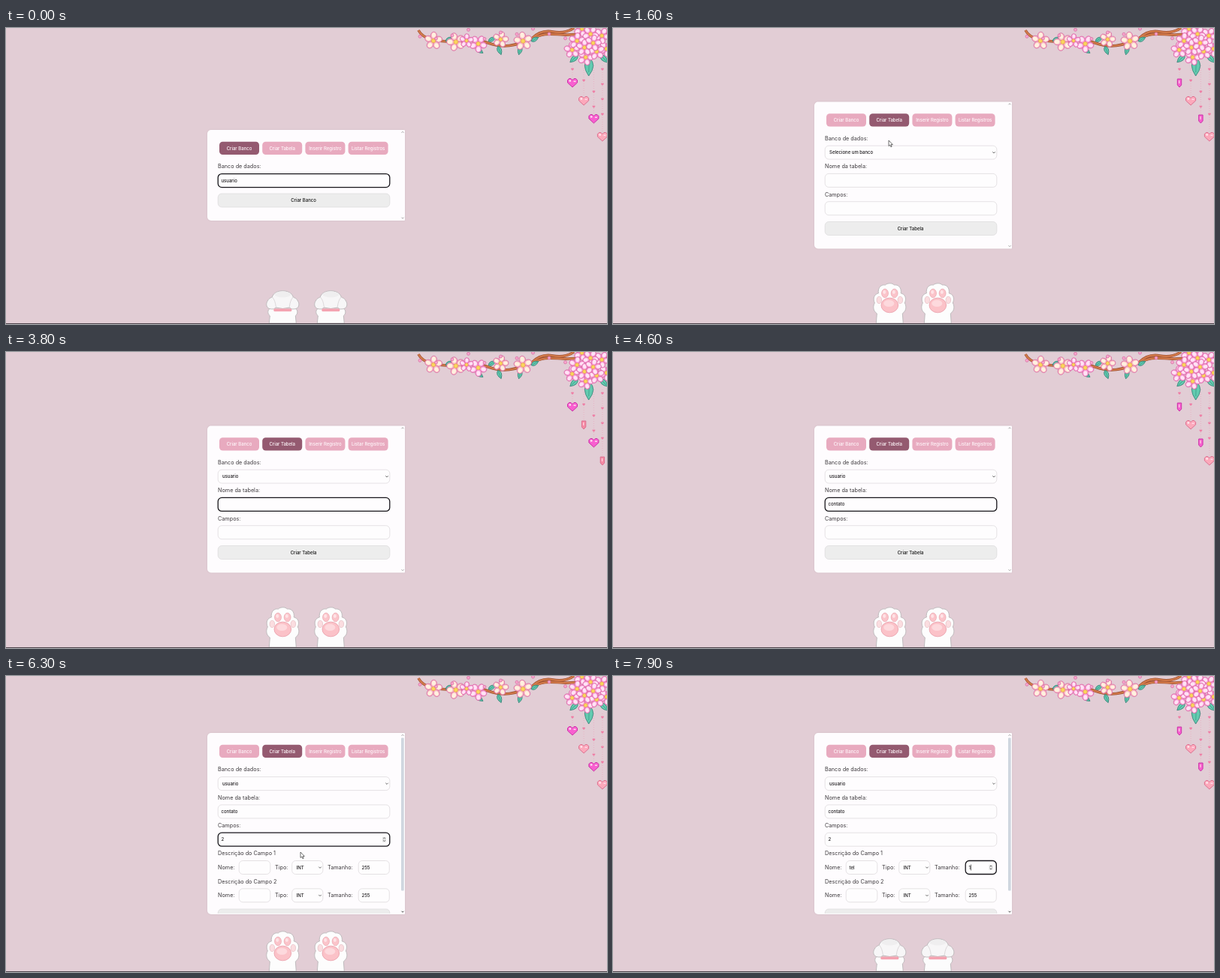
An HTML page with a canvas for the animation above (8000 ms loop, 800 px wide and 395 px high).

```html
<!DOCTYPE html>
<html lang="pt">
<head>
<meta charset="utf-8">
<title>Banco de dados</title>
<style>
html, body { margin: 0; width: 100%; height: 100%; overflow: hidden; background: #e2cdd5; }
canvas { display: block; }
</style>
</head>
<body>
<canvas id="stage" width="800" height="395"></canvas>
<script>
const c = document.getElementById('stage').getContext('2d');
const LOOP = 8000, STEP = 100, FIELD_X = 282, FIELD_W = 229, PITCH = 37.3;
const TABS = ['Criar Banco', 'Criar Tabela', 'Inserir Registro', 'Listar Registros'];
const BANKS = ['Selecione um banco', 'aa', 'animais', 'cacto', 'girassol', 'information_schema', 'dados',
  'performance_schema', 'pessoa', 'inventario', 'test', 'teste1', 'trabalho', 'usuario'];
// Each click: time and place. The pointer glides there shortly before.
const CLICKS = [
  { at: 1500, x: 367, y: 150 }, { at: 1900, x: 420, y: 166 }, { at: 2500, x: 316, y: 337 },
  { at: 3300, x: 339, y: 200 }, { at: 5250, x: 392, y: 235 }, { at: 6700, x: 330, y: 255 }
];
const HOME = { x: 345, y: 205 };
let t = 0;

const between = (a, b) => t >= a && t < b;
const typed = (s, start, gap) => s.slice(0, Math.max(0, Math.floor((t - start) / gap) + 1));
const times = (n, fn) => { for (let i = 0; i < n; i++) fn(i); };
const noise = i => Math.abs(Math.sin(i * 127.1 + 3) * 437.5) % 1;

function paint(fill, stroke, width = 1) {
  if (fill) { c.fillStyle = fill; c.fill(); }
  if (stroke) { c.strokeStyle = stroke; c.lineWidth = width; c.stroke(); }
}
function box(x, y, w, h, r, fill, stroke, width) {
  c.beginPath();
  c.roundRect(x, y, w, h, r);
  paint(fill, stroke, width);
}
function oval(x, y, rx, ry, fill, stroke, width, turn = 0) {
  c.beginPath();
  c.ellipse(x, y, rx, ry, turn, 0, 7);
  paint(fill, stroke, width);
}
function shape(d, fill, stroke, width = 1) {
  const p = new Path2D(d);
  if (fill) { c.fillStyle = fill; c.fill(p); }
  if (stroke) { c.strokeStyle = stroke; c.lineWidth = width; c.stroke(p); }
}
function at(x, y, fn) {
  c.save();
  c.translate(x, y);
  fn();
  c.restore();
}
function text(s, x, y, color = '#1c1a1c', align = 'left', font = '500 6px') {
  c.font = font + ' Inter, sans-serif';
  c.textAlign = align;
  c.textBaseline = 'middle';
  c.fillStyle = color;
  c.fillText(s, x, y + 0.3);
}
const label = (s, x, y) => text(s, x, y, '#3c393c', 'left', '7.25px');
function chevron(x, y, dir = 1, color = '#555', size = 1.7) {
  c.beginPath();
  c.moveTo(x - size, y - dir * size / 2);
  c.lineTo(x, y + dir * size / 2);
  c.lineTo(x + size, y - dir * size / 2);
  paint(null, color, 0.9);
}

function field(x, y, w, value, focus, spin) {
  box(x + .2, y - 9, w - .4, 18, 5, '#fefdfe', focus ? '#17151a' : '#dfdbde', focus ? 1.3 : .8);
  text(value, x + 4.5, y);
  if (spin) {
    box(x + w - 10, y - 3.5, 5, 7, 0, '#e4e4e4');
    chevron(x + w - 7.5, y - 1.8, -1, '#555', 1.3);
    chevron(x + w - 7.5, y + 1.8, 1, '#555', 1.3);
  }
}
function select(x, y, w, value, focus) {
  field(x, y, w, '', focus);
  text(value, x + 6, y);
  chevron(x + w - 4, y);
}
function button(s, y) {
  box(FIELD_X + .2, y - 9, FIELD_W - .4, 18, 5, '#ededed', '#dedcdd', .8);
  text(s, 396, y, '#161616', 'center');
}

function leaf(x, y, len, turn) {
  at(x, y, () => {
    c.rotate(turn);
    const l = len, w = len * .95;
    shape(`M${-l} 0 Q${-l * .3} ${-w} ${l} 0 Q${-l * .3} ${w} ${-l} 0Z`, '#63cbb0', '#338076', .8);
    shape(`M${-l * .7} 0 H${l * .6}`, null, '#3c9c88', .8);
  });
}
function flower(x, y, r, pink) {
  times(5, i => at(x, y, () => {
    c.rotate(i * Math.PI * .4 + x);
    oval(r * .6, 0, r * .43, r * .36, pink ? '#fb9fd8' : '#fbbcc6', '#d5629f', .7);
    oval(r * .66, 0, r * .28, r * .22, pink ? '#ffe3f4' : '#fff1df');
  }));
  oval(x, y, r * .24, r * .24, '#f9d65c', '#e89a50', .6);
}
function branch() {
  const bough = 'M549 3 C556 16 573 17 588 18 S622 13 642 20 S678 24 698 15 S722 8 742 9 S774 4 802 9'
    + ' M700 14 Q712 2 728 5 T756 0';
  shape(bough, null, '#9c4f30', 3.6);
  shape(bough, null, '#d27a4a', 2.2);
  times(3, i => {
    leaf(630 + 27 * i, 30, 6, .6 + i * .6);
    leaf(590 + 57 * i, 15, 5.5, -.5);
    leaf(756 + 20 * i, 41 + i % 2 * 11, 7 + i % 2 * 5, 2.4 - i * .8);
  });
  times(5, i => flower(569 + 29.8 * i, 17 + 4 * Math.sin(i * i * .4), 10 + noise(i) * 2, i === 2));
  flower(613, 17, 9, true);
  times(10, i => oval(551 + 21.5 * i, 1 + noise(i) * 14, 2, 2, '#f9a6cf', '#d5699e', .7));
  // Blossom cluster as a sunflower spiral, outermost first.
  times(10, k => {
    const i = 9 - k, a = i * 2.4, d = 8.3 * Math.sqrt(i + .3);
    flower(777 + d * Math.cos(a), 20 + d * .95 * Math.sin(a), 10.5, true);
  });
}
function heart(x, y, s, fill, stroke) {
  at(x, y, () => {
    c.scale(s, s);
    shape('M0 6 L-6.5 0 V-3.5 L-4.5 -5.5 H-2 L0 -3.5 L2 -5.5 H4.5 L6.5 -3.5 V0 Z', fill, stroke);
  });
}
function garland() {
  const phase = t / STEP % 3;
  times(4, i => {
    const x = 754 + 16 * i - .9 * i * i, y = 73 + 24 * i, odd = i % 2;
    const fill = odd ? '#fca9bb' : '#f85fd0', edge = odd ? '#dc6f90' : '#c935a6';
    c.setLineDash([1, 2]);
    shape(`M${x} 50 V${y - 7}`, null, '#eaa9bd', .7);
    c.setLineDash([]);
    for (let by = 55 + 15 * (i % 3); by < y - 12; by += 20) heart(x, by, .28, '#ee7fa6');
    if (phase === (odd ? 2 : 1)) {
      at(x, y, () => shape('M-2.7 -5 H2.7 V3 L0 6 L-2.7 3 Z', odd ? '#f58ba4' : fill, edge));
      box(x - 1, y - 3, 1.2, 4, 0, '#ffd7e5');
    } else {
      heart(x, y, 1, fill, edge);
      box(x - 4.5, y - 3.5, 2.5, 2, 0, '#fff0f6');
      box(x + 1.5, y - 2.5, 3, 1.5, 0, '#ffd6ea');
    }
  });
}

function openPaw() {
  shape('M-18 53 L-17 40 C-23 36 -22 29 -20 26 C-23 19 -20 14 -15 13 C-16 5 -11 1 -6 2'
    + ' C-3 -1 4 -1 6 2 C11 1 16 5 15 13 C20 14 23 19 20 26 C22 29 23 36 17 40 L18 53 Z', '#fdfdfd', '#bfbbbd');
  for (const side of [-1, 1]) {
    oval(side * 6.3, 13, 4.4, 5.8, '#fbc4ca', '#eba9b2', .8);
    oval(side * 6.3 - .8, 11.5, 2, 2.4, '#fee3e6');
    oval(side * 14, 22, 3.2, 4.6, '#fbdde0', '#e8c3c8', .8);
  }
  oval(0, 29, 11.3, 9.8, '#fbc2c8', '#eba3ae', .9);
  oval(-1, 26.5, 7, 4.5, '#fdd9dd');
}
function closedPaw() {
  shape('M-18 53 L-17 43 C-21 40 -20 34 -16 33 H16 C20 34 21 40 17 43 L18 53 Z', '#fcfcfc', '#bfbbbd');
  shape('M-15 34 C-22 34 -23 27 -20 23 C-18 19 -15 19 -14 18 C-11 7 11 7 14 18'
    + ' C15 19 18 19 20 23 C23 27 22 34 15 34 Q12 35 9 32 Q0 35 -9 32 Q-12 35 -15 34 Z', '#f7f6f7', '#bfbbbd');
  oval(0, 14.5, 11, 4, '#efeeef');
  shape('M-14 18 Q-10 22 -9 31 M14 18 Q10 22 9 31', null, '#d8d4d6', .9);
  box(-12, 33.5, 24, 3.8, 1.5, '#f4a2b0');
}

function panel() {
  const table = t >= 1500, fields = t >= 5700, sent = t >= 400;
  const y = fields ? 76 : table ? 98.5 : sent ? 131 : 136;
  const h = fields ? 242 : table ? 196 : sent ? 132 : 121;
  const labelY = k => y + 49 + PITCH * k, rowY = k => y + 67.6 + PITCH * k;
  const x = FIELD_X, w = FIELD_W;

  c.save();
  c.shadowColor = '#0001';
  c.shadowBlur = 3;
  box(268, y, 263, h, [5, 1, 1, 5], '#fefcfe');
  c.shadowColor = 'transparent';
  c.beginPath();
  c.rect(268, y, 263, h - 1);
  c.clip();

  TABS.forEach((s, i) => {
    const on = i === +table, left = 284 + 57.2 * i;
    box(left, y + 15.8, 53, 17.3, 4.5, on ? '#945a70' : '#e8aabf');
    text(s, left + 26.5, y + 24.5, '#fff8fb', 'center');
  });
  label('Banco de dados:', x, labelY(0));
  if (!table) {
    field(x, rowY(0), w, 'usuario', !sent);
    button('Criar Banco', y + 94);
    if (sent) label("Banco de dados 'usuario' criado com sucesso!", x, y + 112.5);
  } else {
    select(x, rowY(0), w, t < 2600 ? BANKS[0] : 'usuario');
    label('Nome da tabela:', x, labelY(1));
    field(x, rowY(1), w, typed('contato', 4000, 100), between(3300, 5300));
    label('Campos:', x, labelY(2));
    field(x, rowY(2), w, fields ? '2' : '', between(5300, 6700), between(5200, 6700));
    if (fields) {
      for (let k = 3; k < 5; k++) {
        const ry = rowY(k), first = k === 3, size = first && t >= 7500;
        label('Descrição do Campo ' + (k - 2), x, labelY(k));
        label('Nome:', x, ry);
        field(310, ry, 42, first ? typed('tel', 6800, 200) : '', first && between(6700, 7300));
        label('Tipo:', 358, ry);
        select(380.5, ry, 41.5, 'INT', first && between(7300, 7500));
        label('Tamanho:', 428, ry);
        field(469, ry, 41.5, size && t >= 7700 ? '1' : '255', size, size);
        if (size && t < 7700) {
          box(473, ry - 4, 12, 8, 0, '#1967d2');
          text('255', 473.5, ry, '#fff');
        } else if (size) box(476, ry - 4, .7, 8, 0, '#333');
      }
    }
    button(fields ? '' : 'Criar Tabela', fields ? y + 244 : y + 169);
  }
  if (fields) box(526, y + 6.5, 3.7, 204, 1, '#cfd6df');
  chevron(528, y + 3, -1, '#999', 1.5);
  chevron(528, y + h - 3.5, 1, fields ? '#333' : '#999', 1.5);
  c.restore();
}

function dropdown(pointer) {
  if (!between(2000, 2600)) return;
  box(503, 157.5, 7.5, 18, 0, '#d9d9dc', '#bbb', .6);
  chevron(507, 166.5);
  c.save();
  c.shadowColor = '#0005';
  c.shadowBlur = 4;
  box(282, 176, 229, 168, 0, '#fefdfe', '#555', .9);
  c.restore();
  const hover = Math.max(0, Math.floor((pointer.y - 176) / 12));
  BANKS.forEach((s, i) => {
    if (i === hover) box(282.5, 176 + 12 * i, 228, 12, 0, '#1766d0');
    text(s, 288.5, 182 + 12 * i, i === hover ? '#fff' : '#1c1a1c');
  });
}

function findPointer() {
  const i = CLICKS.findIndex(k => t < k.at + 200), to = CLICKS[i];
  if (!to || t < to.at - 400) return null;
  const from = CLICKS[i - 1] || HOME, u = Math.min(1, (t - to.at + 400) / 300), e = u * u * (3 - 2 * u);
  return {
    x: from.x + (to.x - from.x) * e,
    y: from.y + (to.y - from.y) * e,
    pressed: Math.abs(t - to.at) < 100
  };
}
function drawPointer(p) {
  if (!p) return;
  at(p.x, p.y, () => shape('M0 0 V7.5 L1.7 6 L2.9 8.7 L4.1 8.2 L3 5.6 H5.3 Z', '#fff', '#333', .7));
  if (p.pressed) oval(p.x, p.y, 12.7, 12.7, '#fae32f');
}

const start = performance.now();
function draw() {
  t = Math.floor((performance.now() - start) % LOOP / STEP) * STEP;
  c.fillStyle = '#e2cdd5';
  c.fillRect(0, 0, 800, 395);
  garland();
  branch();
  const beat = t % 600, paw = beat >= 200 && beat < 500 ? openPaw : closedPaw;
  at(368.3, 341, paw);
  at(432.3, 341, paw);
  const pointer = findPointer();
  panel();
  dropdown(pointer);
  drawPointer(pointer);
  c.fillStyle = '#4d434b';
  c.fillRect(0, 394, 800, 1);
  requestAnimationFrame(draw);
}
draw();
</script>
</body>
</html>
```
